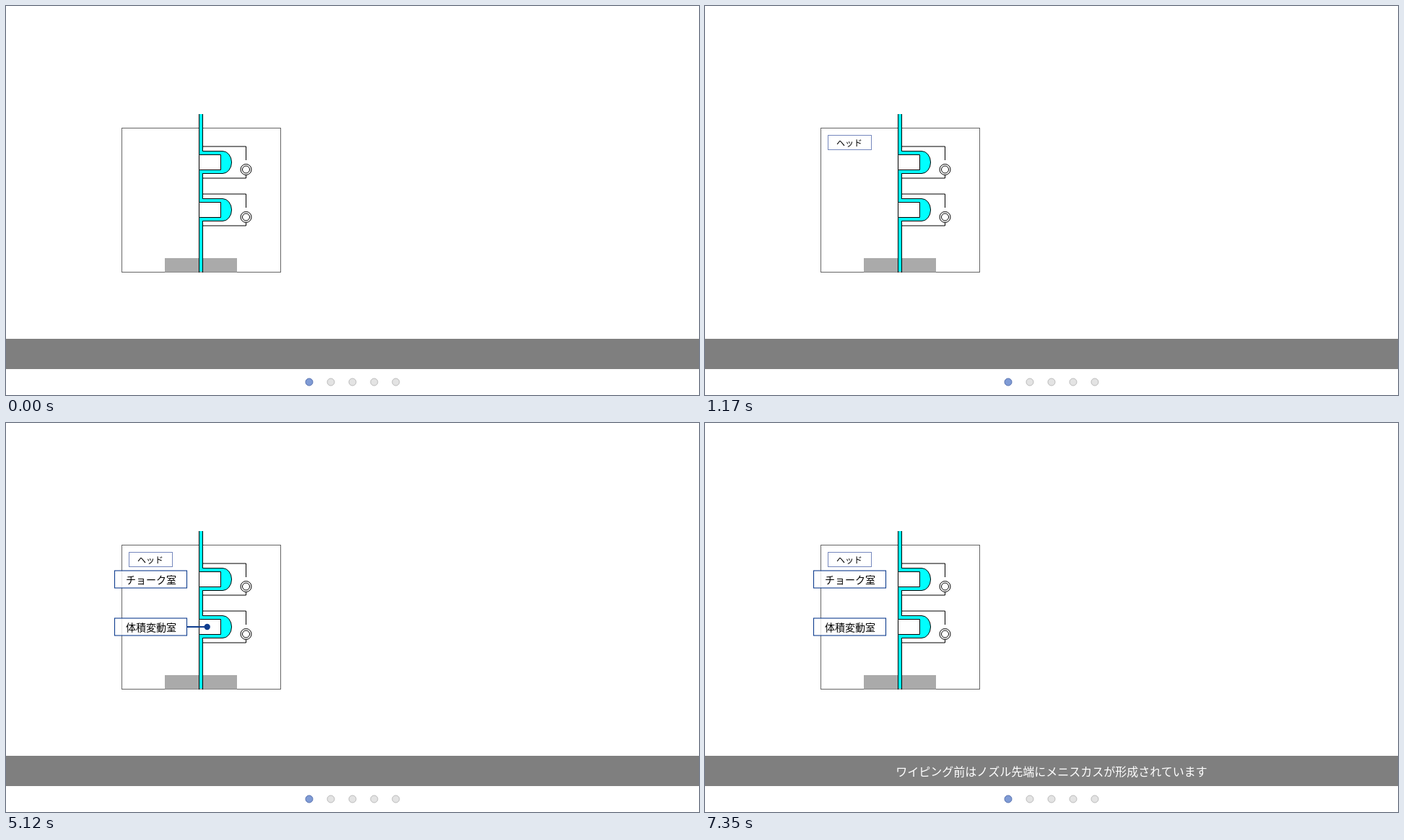
An HTML page for the animation above (8000 ms loop, 960 by 540 pixels).

```html
<!DOCTYPE html>
<html lang="ja">
<head>
<meta charset="utf-8">
<style>
  html, body { margin: 0; width: 100%; height: 100%; overflow: hidden; background: #fff; }
  svg { display: block; width: 100%; height: 100%; }
  text { font-family: "Noto Sans CJK JP", "Noto Sans CJK", sans-serif; text-anchor: middle; }
  .label rect { fill: #fff; fill-opacity: .8; stroke: #0f3d8f; stroke-width: 1.1; }
  .label text { font-size: 14px; font-weight: 500; }
  .pointer { stroke: #0f3d8f; fill: #0f3d8f; stroke-width: 2; }
  .pointer circle { stroke: none; }
</style>
</head>
<body>
<svg viewBox="0 0 960 540">
  <defs>
    <!-- Chamber with its bypass circuit, centred on y = 0 -->
    <g id="chamber" stroke="#000">
      <path d="M272.5-22H332.5V-3M272.5 22H332.5V17" fill="none"/>
      <path d="M272.5-15.5H300A12.5 15.5 0 0 1 300 15.5H272.5" fill="#0ff"/>
      <path d="M268-15H273V15H268Z" fill="#0ff" stroke="none"/>
      <path d="M267.5-9.5L268.5-10.5H297.5V10.5H268.5L267.5 11.5Z" fill="#fff"/>
      <circle cx="332.5" cy="10" r="7.5" fill="#fff"/>
      <circle cx="332.5" cy="10" r="5" fill="#fff"/>
    </g>
    <g id="pointer" class="pointer">
      <path d="M250 0H279"/>
      <circle cx="278.7" r="4.2"/>
    </g>
  </defs>

  <rect x="160.5" y="169.5" width="220" height="200" fill="none" stroke="#666"/>
  <rect x="220" y="350" width="100" height="19.5" fill="#aaa"/>
  <rect x="267.5" y="150" width="5" height="218.5" fill="#0ff"/>
  <path d="M267.5 150V370M272.5 150V370" stroke="#000"/>
  <use href="#chamber" y="217"/>
  <use href="#chamber" y="283"/>

  <g data-from="1170">
    <rect x="170.5" y="179.5" width="60" height="20" fill="#fff" stroke="#7587bd"/>
    <text x="200" y="194.5" font-size="12">ヘッド</text>
  </g>
  <g class="label" data-from="2210">
    <rect x="150.5" y="205" width="100" height="24"/>
    <text x="201" y="222.5">チョーク室</text>
  </g>
  <use href="#pointer" y="217" data-from="2210" data-to="3250"/>
  <g class="label" data-from="3250">
    <rect x="150.5" y="271" width="100" height="24"/>
    <text x="201" y="288.5">体積変動室</text>
  </g>
  <use href="#pointer" y="283" data-from="3250" data-to="6370"/>

  <rect y="462" width="960" height="42" fill="#7f7f7f"/>
  <text x="480" y="490" font-size="16" font-weight="300" fill="#fff" data-from="6370">ワイピング前はノズル先端にメニスカスが形成されています</text>

  <g fill="#e3e3e3" stroke="#bcbcbc">
    <circle cx="420" cy="522" r="5" fill="#7f9bd5" stroke="#5872b0"/>
    <circle cx="450" cy="522" r="5"/>
    <circle cx="480" cy="522" r="5"/>
    <circle cx="510" cy="522" r="5"/>
    <circle cx="540" cy="522" r="5"/>
  </g>
</svg>
<script>
  const LOOP = 8000;
  const timed = [...document.querySelectorAll('[data-from]')];
  const start = performance.now();

  function draw() {
    const time = (performance.now() - start) % LOOP;
    for (const part of timed) {
      const { from, to = LOOP } = part.dataset;
      part.style.display = time >= +from && time < +to ? '' : 'none';
    }
    requestAnimationFrame(draw);
  }
  draw();
</script>
</body>
</html>
```
